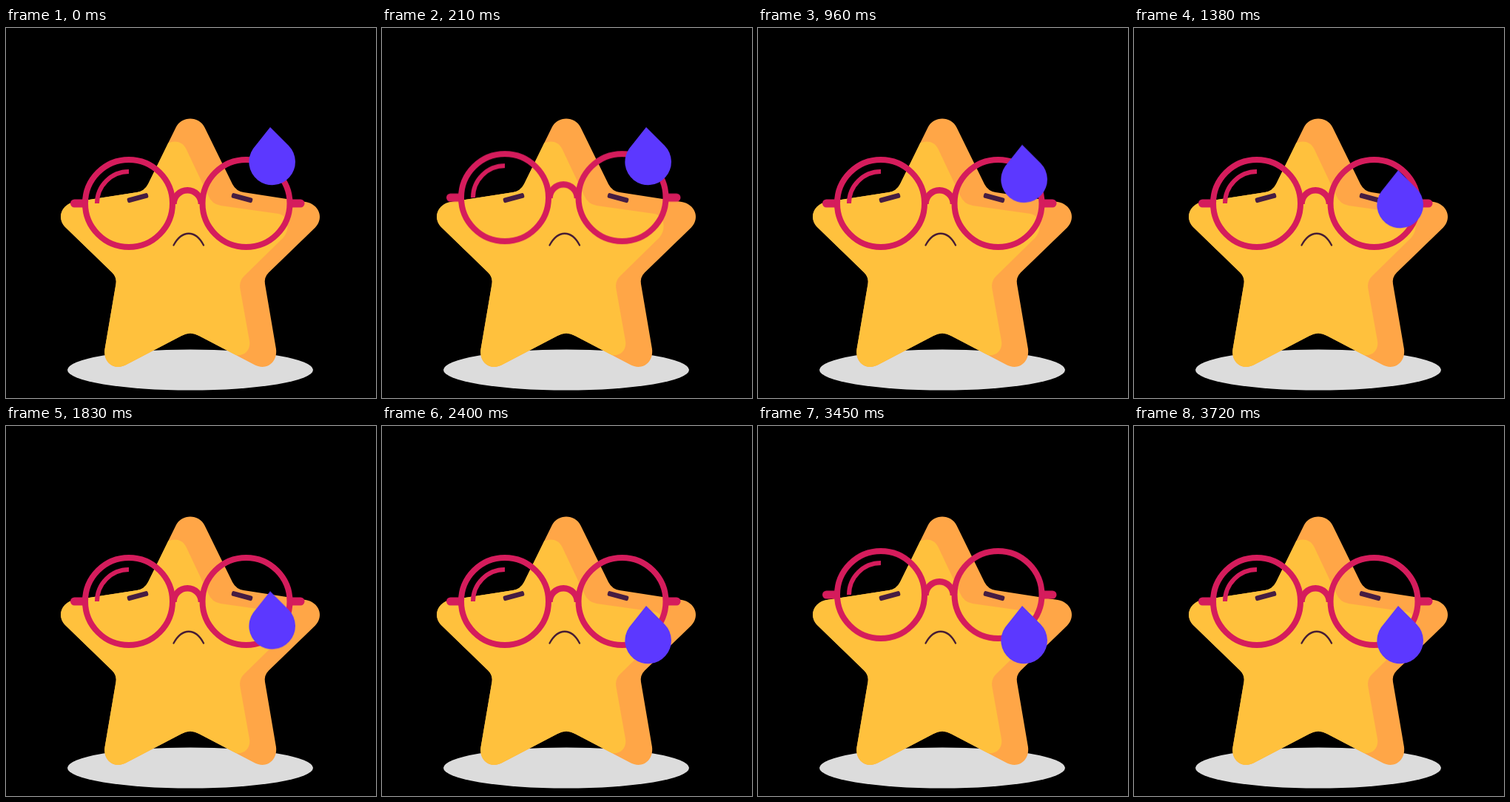
Recreate the animation shown at these times as an HTML page without scripts. Size 500 by 500 pixels, loop 6330 ms.

```html
<!DOCTYPE html>
<html lang="en">
<head>
<meta charset="utf-8">
<title>Worried star</title>
<style>
  html, body { margin: 0; width: 100%; height: 100%; overflow: hidden; background: #000; }
  svg { display: block; width: 100%; height: 100%; }
  .glasses { fill: none; stroke: #d51c5c; stroke-width: 8; animation: nudge 6330ms linear infinite; }
  .drop { fill: #5c38ff; animation: slide 6330ms linear infinite; }
  .ink { fill: #461d42; }

  /* two quick hops: 0-570 ms and 3150-3720 ms */
  @keyframes nudge {
    0%, 9.005%, 49.763%, 58.768%, 100% { transform: translateY(0); }
    4.265%, 54.028% { transform: translateY(-10px); }
  }
  /* slides from 660 to 2400 ms, then rests until the loop restarts */
  @keyframes slide {
    0% { transform: translateY(0); }
    10.427% { transform: translateY(0); animation-timing-function: cubic-bezier(.167, .167, .667, 1); }
    37.915%, 100% { transform: translateY(109px); }
  }
</style>
</head>
<body>
<svg viewBox="0 0 500 500">
  <defs>
    <path id="star" d="M229.500 134.500 C237 118.500 261 118.500 268.500 134.500 L306 211 Q311 220.500 321 222
      L405 235 C423 238 430.500 257 417.500 270 L355 330.500 Q348.500 337 350 346
      L365 434 C367 452 352 463 336.500 455.500 L261 416 Q249 409 237 416
      L161.500 455.500 C146 463 131 452 133.500 434 L148.500 346 Q150 337 143.500 330.500
      L81 270 C67.500 257 75 238 93 235 L177 222 Q187 220.500 192 211 Z"/>
    <clipPath id="body"><use href="#star"/></clipPath>
  </defs>

  <ellipse cx="249" cy="462" rx="166" ry="27.500" fill="#dcdcdc"/>

  <use href="#star" fill="#ffa647"/>
  <path clip-path="url(#body)" fill="#ffc13d" d="M60 155 H220 C229 151.500 239 154 243.500 163.500
    L273 226 Q278 238 290 240 L368 251 C381 253 385 271 375 283
    L322 335 Q314.500 342 316.500 353 L329 423 C331 436 321 445 308 441.500 L270 475 H60 Z"/>

  <g class="ink">
    <rect x="163.500" y="226.200" width="29" height="6.800" rx="2.500" transform="rotate(-15 178 229.600)"/>
    <rect x="304.500" y="226.200" width="29" height="6.800" rx="2.500" transform="rotate(15 319 229.600)"/>
  </g>
  <path d="M226.500 293.500 C238 272.500 256 272.500 267 293.500" fill="none" stroke="#461d35" stroke-width="2.300" stroke-linecap="round"/>

  <g class="glasses">
    <path d="M92.500 237 H104 M387 237 H398" stroke-width="11" stroke-linecap="round"/>
    <circle cx="166" cy="237" r="59"/>
    <circle cx="324.500" cy="237" r="59"/>
    <path d="M226.500 238 A18.700 18.700 0 0 1 263.900 238" stroke-width="8.500"/>
    <path d="M123 237 A43 43 0 0 1 166 194" stroke-width="6"/>
  </g>

  <path class="drop" d="M357 134 L382 159 A31.300 31.300 0 1 1 334 163 Z"/>
</svg>
</body>
</html>
```
